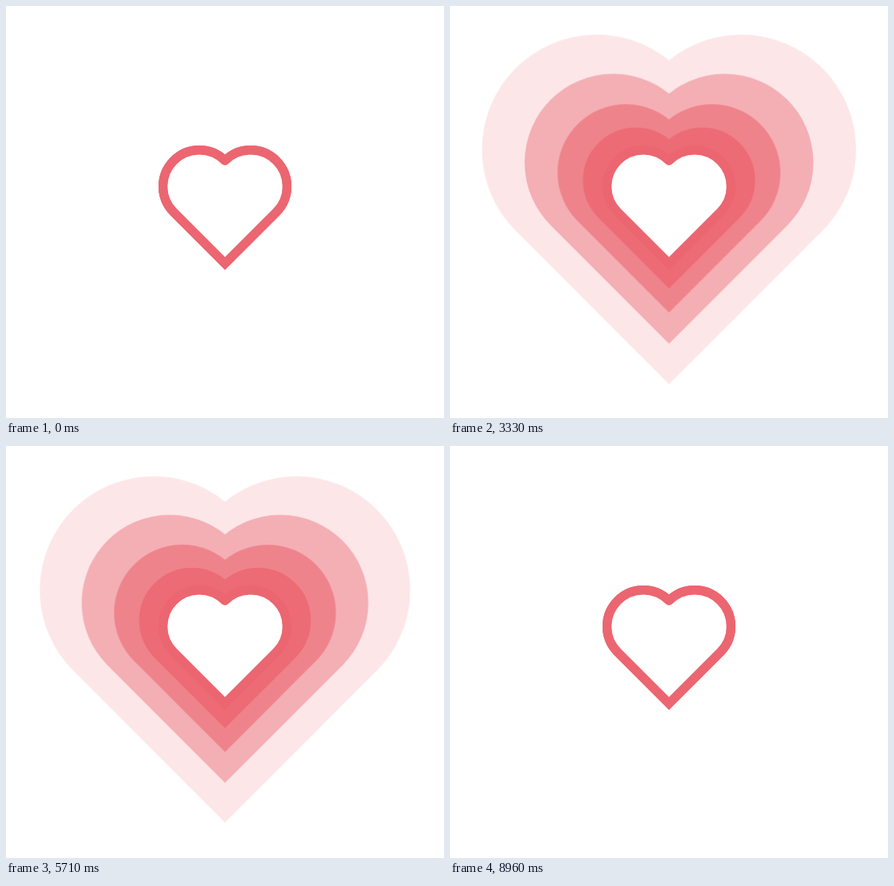
An HTML page for the animation above (9000 ms loop, 600 px wide and 564 px high).

```html
<!DOCTYPE html>
<html lang="en">
<head>
<meta charset="utf-8">
<title>Pulsing heart</title>
<style>
  html, body {
    margin: 0;
    width: 100%;
    height: 100%;
    overflow: hidden;
    background: #fff;
  }

  svg {
    display: block;
    width: 100%;
    height: 100%;
    color: #eb6670;
  }

  #heart {
    stroke: currentColor;
    stroke-width: 12.3;
    stroke-linecap: round;
  }

  .halo { fill: currentColor; }
  .core { fill: #fff; }

  /* Nested groups multiply their scales, so the outer halos grow fastest. */
  .grow {
    transform-origin: 300px 274.8px;
    animation: grow 4500ms cubic-bezier(.505, 0, .495, 1) infinite alternate;
  }

  @keyframes grow {
    from { transform: scale(1); }
    to { transform: scale(1.33333); }
  }
</style>
</head>
<body>
<svg viewBox="0 0 600 564">
  <defs>
    <path id="heart" d="M300 211.8 A49.7 49.7 0 0 0 229.7 282.1 L300 352.4 L370.3 282.1 A49.7 49.7 0 0 0 300 211.8"/>
  </defs>
  <g class="grow">
    <g class="grow">
      <g class="grow">
        <g class="grow">
          <use href="#heart" class="halo" opacity=".16"/>
        </g>
        <use href="#heart" class="halo" opacity=".43"/>
      </g>
      <use href="#heart" class="halo" opacity=".6"/>
    </g>
    <use href="#heart" class="halo" opacity=".8"/>
  </g>
  <use href="#heart" class="core"/>
</svg>
</body>
</html>
```
